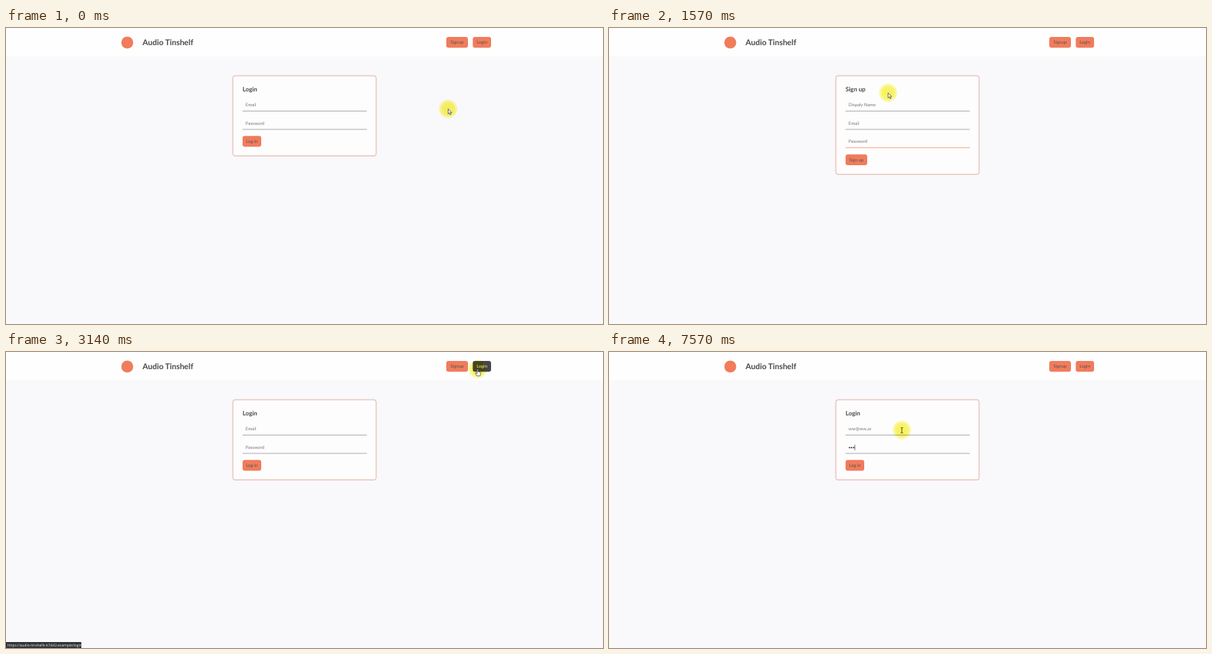
Animation, 800 px wide and 397 px high, one loop 8 s. Source, as an HTML page:

```html
<!DOCTYPE html>
<html lang="en">
<head>
<meta charset="utf-8">
<title>Login and sign up</title>
<style>
  html, body { margin: 0; width: 100%; height: 100%; overflow: hidden; background: #f9f8fa; }
  svg { display: block; width: 100%; height: 100%; }
  text { font-family: Lato, "Open Sans", sans-serif; font-size: 6px; fill: #777; text-rendering: geometricPrecision; white-space: pre; }
  .title { font-size: 10.6px; font-weight: 700; fill: #484848; }
  .heading { font-size: 8.2px; font-weight: 700; fill: #484848; }
  .button rect { fill: #f07c5c; }
  .button text { fill: #5c5350; text-anchor: middle; }
  .button.hover rect { fill: #474747; }
  .button.hover text { fill: #fff; }
  .line { stroke: #a3a3a5; stroke-width: .9; }
  .line.accent { stroke: #f3a173; }
  .status text { font-size: 4.9px; fill: #f4f4f4; font-family: "Open Sans", sans-serif; }
  #halo { mix-blend-mode: multiply; }
  .outline { fill: #fff; stroke: #3a3a48; stroke-width: .7; stroke-linejoin: round; }
</style>
</head>
<body>
<svg viewBox="0 0 800 397">
  <defs>
    <radialGradient id="glow">
      <stop offset="0" stop-color="#f8f25c"/>
      <stop offset=".6" stop-color="#faf568"/>
      <stop offset=".82" stop-color="#fbf88f" stop-opacity=".75"/>
      <stop offset="1" stop-color="#fdfbc0" stop-opacity="0"/>
    </radialGradient>
  </defs>
  <rect width="800" height="397" fill="#f9f8fa"/>
  <rect width="800" height="38.5" fill="#fefefe"/>
  <circle cx="162.5" cy="19.5" r="8" fill="#f07c5c"/>
  <text class="title" x="183" y="23">Audio Tinshelf</text>
  <g id="nav"></g>
  <rect id="card" x="304" y="64" width="192" rx="3" fill="#fefdfe" stroke="#dcaa9b" stroke-width=".9"/>
  <g id="loginForm"></g>
  <g id="signupForm"></g>
  <g id="dots" fill="#333"></g>
  <rect id="caret" width=".6" height="7.4" fill="#333"/>
  <g class="status" id="status">
    <path id="statusBox" fill="#313338"/>
    <text x="2" y="395"></text>
  </g>
  <g id="pointer">
    <circle id="halo" r="13.5" fill="url(#glow)"/>
    <path id="arrow" class="outline" d="M0 0V6.8L1.6 5.4L2.7 7.9L3.8 7.4L2.7 5H4.8Z"/>
    <path id="hand" class="outline" d="M-.7 .3Q0-.5.7.3V3.3L3.2 3.9Q4 4.2 4 5V6.4L3.2 9H-1L-3 5.8Q-2.8 4.7-1.8 5.2L-.7 6.2Z"/>
    <path id="beam" fill="none" stroke="#3c3c30" stroke-width=".8" d="M-1.6-3H-.4L0-2.6L.4-3H1.6M0-2.6V3.6M-1.6 4H-.4L0 3.6L.4 4H1.6"/>
  </g>
</svg>
<script>
const LOOP = 8000, FPS = 7, TEXT_X = 321;
const SITE = 'https://audio-tinshelfs-k7d42.example/';

// step, x, y
const PATH = [
  [0, 592.5, 108.5], [2, 595, 92], [5, 606, 26], [6, 606, 23], [8, 607, 23],
  [9, 590, 34], [10, 470, 66], [11, 374, 87], [14, 372, 90], [16, 392, 92],
  [18, 540, 62], [19, 602.5, 39], [20, 630, 24], [22, 632, 23],
  [23, 560, 55], [24, 415, 98], [25, 392.5, 104.5]
];

// step, email, password length, focused field (0 none, 1 email, 2 password)
const TYPING = [
  [0, '', 0, 0], [30, '', 0, 1], [31, 'w', 0, 1], [32, 'ww', 0, 1],
  [35, 'ww@', 0, 1], [37, 'ww@w', 0, 1], [41, 'ww@ww.', 0, 1],
  [42, 'ww@ww.z', 0, 1], [43, 'ww@ww.zz', 0, 1], [44, 'ww@ww.zz', 0, 0],
  [46, 'ww@ww.zz', 0, 2], [47, 'ww@ww.zz', 0, 0],
  [49, 'ww@ww.zz', 1, 2], [51, 'ww@ww.zz', 2, 2], [52, 'ww@ww.zz', 3, 2]
];

const $ = id => document.getElementById(id);
const show = (node, on) => { node.style.display = on ? '' : 'none'; };

function add(parent, tag, attrs, content = '') {
  const node = document.createElementNS('http://www.w3.org/2000/svg', tag);
  for (const key in attrs) node.setAttribute(key, attrs[key]);
  node.textContent = content;
  return parent.appendChild(node);
}

function button(parent, x, y, width, label) {
  const group = add(parent, 'g', { class: 'button' });
  add(group, 'rect', { x, y, width, height: 14.5, rx: 3 });
  add(group, 'text', { x: x + width / 2, y: y + 9.4 }, label);
  return { group, x, y, width };
}

function form(parent, heading, fields, action, width) {
  add(parent, 'text', { class: 'heading', x: 317, y: 84.6 }, heading);
  const labels = fields.map((label, i) => {
    const y = 105.2 + i * 24.6;
    add(parent, 'line', { class: i === 2 ? 'line accent' : 'line', x1: 317, x2: 483.5, y1: y + 6.2, y2: y + 6.2 });
    return add(parent, 'text', { x: TEXT_X, y }, label);
  });
  button(parent, 317, 95.6 + fields.length * 24.6, width, action);
  return labels;
}

const signupButton = { ...button($('nav'), 590, 12, 29, 'Signup'), page: 'signup', bar: 104 };
const loginButton = { ...button($('nav'), 625.5, 12, 24.5, 'Login'), page: 'login', bar: 101 };
const [email, password] = form($('loginForm'), 'Login', ['Email', 'Password'], 'Log in', 25);
form($('signupForm'), 'Sign up', ['Dispaly Name', 'Email', 'Password'], 'Sign up', 29);
const dots = [0, 1, 2].map(i => add($('dots'), 'circle', { cx: 322.4 + i * 2.75, cy: 128.3, r: 1 }));

function pointerAt(step) {
  const next = PATH.findIndex(p => p[0] > step);
  if (next < 0) return PATH[PATH.length - 1].slice(1);
  const [s0, x0, y0] = PATH[next - 1], [s1, x1, y1] = PATH[next];
  const k = (step - s0) / (s1 - s0);
  return [x0 + (x1 - x0) * k, y0 + (y1 - y0) * k];
}

function drawPointer(step) {
  const [x, y] = pointerAt(step);
  const over = [signupButton, loginButton].find(b => {
    const inside = x >= b.x && x <= b.x + b.width && y >= b.y && y <= b.y + 14.5;
    b.group.classList.toggle('hover', inside);
    return inside;
  });
  const typing = x > 317 && x < 483 && y > 96 && y < 112;
  $('pointer').setAttribute('transform', `translate(${x} ${y})`);
  show($('hand'), over);
  show($('beam'), !over && typing);
  show($('arrow'), !over && !typing);
  show($('status'), over);
  if (over) {
    $('statusBox').setAttribute('d', `M0 389H${over.bar - 1}q1 0 1 1V397H0Z`);
    $('status').querySelector('text').textContent = SITE + over.page;
  }
}

function drawForms(step) {
  const signup = step >= 8 && step < 22;
  show($('signupForm'), signup);
  show($('loginForm'), !signup);
  $('card').setAttribute('height', signup ? 132.3 : 107.6);

  const [, address, count, focus] = TYPING.filter(row => row[0] <= step).pop();
  email.textContent = address || 'Email';
  password.textContent = count ? '' : 'Password';
  dots.forEach((dot, i) => show(dot, i < count));
  show($('caret'), focus);
  if (focus) {
    const width = focus === 2 ? count * 2.8 : address ? email.getComputedTextLength() : 0;
    $('caret').setAttribute('x', TEXT_X + width);
    $('caret').setAttribute('y', focus === 2 ? 124.3 : 99.7);
  }
}

let shown = -1;
function tick() {
  const time = performance.now() % LOOP;
  const step = Math.floor((time + 5) * FPS / 1000) % (LOOP * FPS / 1000);
  if (step !== shown) {
    drawForms(step);
    drawPointer(step);
    shown = step;
  }
  requestAnimationFrame(tick);
}
tick();
</script>
</body>
</html>
```
